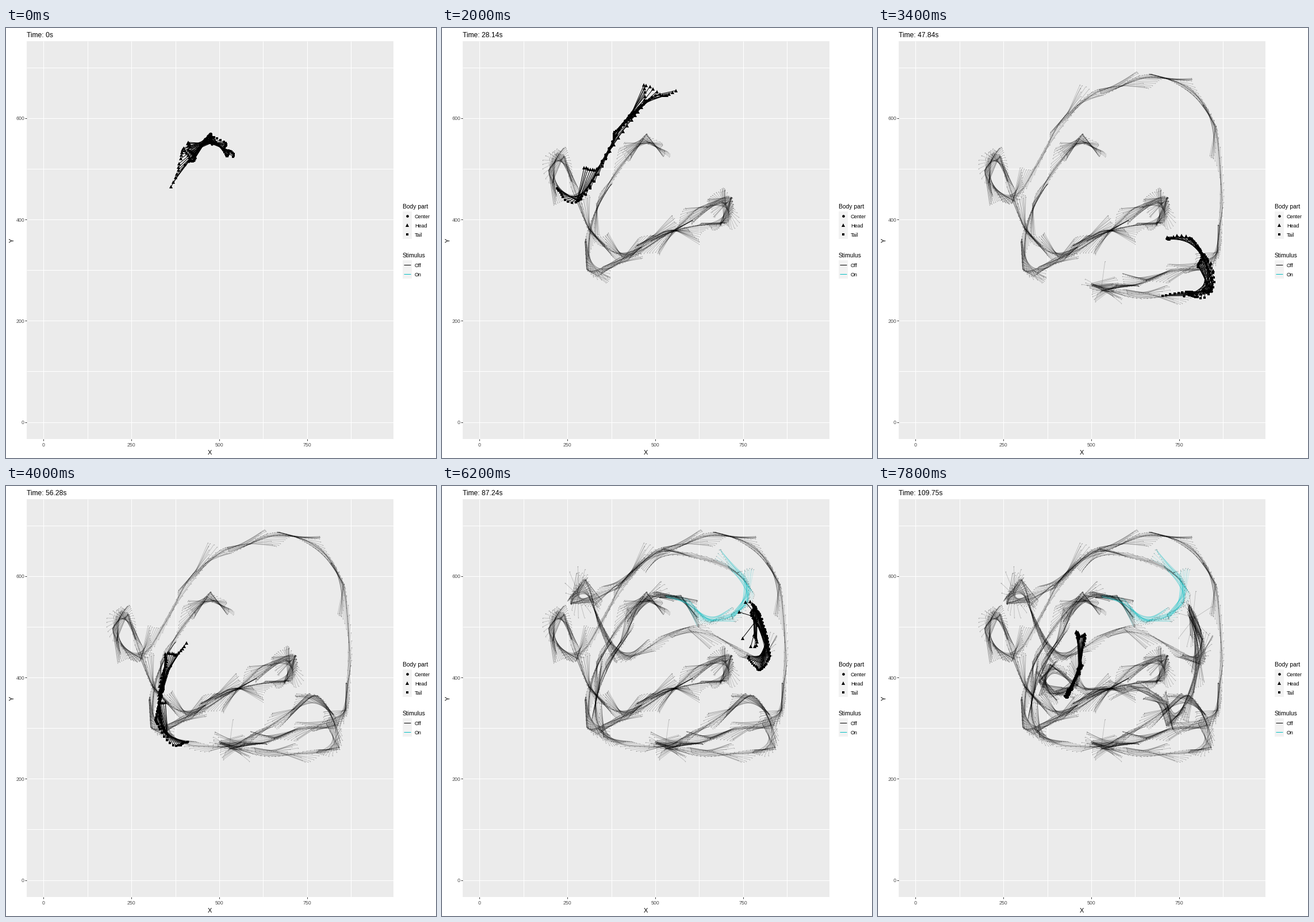
Write a matplotlib script that moves like this. It is 748 px wide and 748 px high and loops after 8 s.

```python
import numpy as np
import matplotlib.pyplot as plt
from matplotlib.animation import FuncAnimation
from matplotlib.collections import LineCollection
from matplotlib.patches import Rectangle

SIZE, DPI = 748, 100
FRAMES, STEP_MS = 40, 200
SECONDS = 2.8141
RATE = 36                           # tracked poses per frame
STRIDE = 2 / 3                      # frames from one resting point to the next
SCALE = np.array([0.6105, 0.88])    # pixels per data unit
HEAD_LEN, TAIL_LEN = 64, 59         # data units
STIM = (23.3, 25.42)                # stimulus interval, in frames
TEAL = "#00BFC4"

# Resting points of the body centre in pixels; the first and last only aim the body
ROUTE = [
    (398, 226), (362, 198), (345, 195), (268, 308), (252, 420), (309, 406),
    (365, 362), (405, 350), (490, 338), (505, 300), (462, 310), (400, 352),
    (312, 398), (256, 345), (212, 222), (186, 250), (235, 300), (329, 148),
    (425, 97), (510, 90), (588, 170), (590, 390), (542, 416), (465, 438),
    (414, 450), (372, 448), (470, 465), (578, 452), (542, 365), (500, 390),
    (400, 447), (279, 436), (271, 347), (310, 273), (350, 196), (405, 190),
    (423, 200), (470, 237), (532, 200), (514, 147), (384, 112), (305, 175),
    (225, 205), (250, 168), (284, 262), (325, 300), (430, 248), (555, 308),
    (562, 268), (540, 208), (555, 275), (548, 355), (507, 415), (500, 375),
    (440, 350), (360, 355), (300, 310), (282, 340), (305, 361), (346, 345),
    (350, 314), (352, 306), (354, 230),
]

plt.rcParams["font.family"] = "Liberation Sans"


def spline(points, u):
    """Catmull-Rom curve through the points, u counted in points."""
    p = np.vstack([2 * points[0] - points[1], points, 2 * points[-1] - points[-2]])
    k = np.clip(u.astype(int), 0, len(points) - 2)
    f = (u - k)[:, None]
    a, b, c, d = (p[k + j] for j in range(4))
    return b + f / 2 * (c - a + f * (2 * a - 5 * b + 4 * c - d
                                     + f * (3 * (b - c) + d - a)))


def smooth(a, n):
    pad = np.pad(a, ((n // 2, n // 2), (0, 0)), mode="edge")
    return np.stack([np.convolve(col, np.ones(n) / n, "valid") for col in pad.T], axis=1)


def reach(centre, goal, length, swing):
    """End of a limb that points from the centre to a goal, turned by swing."""
    v = goal - centre
    angle = np.arctan2(v[:, 1], v[:, 0]) + swing
    v = np.stack([np.cos(angle), np.sin(angle)], axis=1)
    return centre + length[:, None] * v


def build_track():
    points = np.array(ROUTE) / SCALE
    u = np.linspace(0, len(points) - 1, 6000)
    path = spline(points, u)
    arc = np.append(0, np.cumsum(np.hypot(*np.diff(path, axis=0).T)))

    def along(s):
        return np.stack([np.interp(s, arc, c) for c in path.T], axis=1)

    t = np.arange(FRAMES * RATE) / RATE
    leg, p = np.divmod(t / STRIDE, 1)
    s = np.interp(1 + leg + p * p * (3 - 2 * p), u, arc)
    rest = 1 - 4 * p * (1 - p)

    rng = np.random.default_rng(4)
    centre = along(s) + smooth(rng.normal(0, 7, (len(t), 2)), 9)
    ahead = smooth(along(s + HEAD_LEN), 5)
    behind = smooth(along(s - TAIL_LEN), 5)
    sway = np.sin(8.2 * t + 2 * np.sin(2.3 * t))
    wave = 2 * np.pi * SECONDS * t
    head = reach(centre, ahead, HEAD_LEN + 5 * np.sin(wave), (.12 + .4 * rest) * sway)
    tail = reach(centre, behind, TAIL_LEN + 5 * np.cos(wave), -.12 * sway)
    return t, np.stack([head, centre, tail], axis=1) * SCALE + 0.5


times, track = build_track()
stim_on = (times >= STIM[0]) & (times < STIM[1])
colors = np.where(stim_on, TEAL, "#000000")

fig = plt.figure(figsize=(SIZE / DPI, SIZE / DPI), dpi=DPI, facecolor="white")
ax = fig.add_axes([0, 0, 1, 1])
ax.set(xlim=(0, SIZE), ylim=(SIZE, 0))
ax.axis("off")


def px(n):
    return n * 72 / DPI


def box(x, y, w, h, color):
    ax.add_patch(Rectangle((x, y), w, h, fc=color, ec="none", zorder=0))


def line(xs, ys, color):
    ax.plot(xs, ys, color=color, lw=px(1), zorder=1, solid_capstyle="butt")


def text(x, y, s, size, color="black", ha="left", va="center_baseline", **kw):
    return ax.text(x, y, s, fontsize=px(size), color=color, ha=ha, va=va, **kw)


L, R, T, B = 36.5, 674, 22.5, 715
box(L, T, R - L, B - T, "#EBEBEB")
for k in range(8):
    gx, gy = 65.5 + k * 76.35, 685.5 - k * 88.1
    line([gx, gx], [T, B], "white")
    line([L, R], [gy, gy], "white")
    if k % 2 == 0:
        line([gx, gx], [B, B + 3], "#333333")
        line([L - 3, L], [gy, gy], "#333333")
        text(gx, 725, str(125 * k), 8.8, "#4D4D4D", ha="center")
        text(32, gy, str(100 * k), 8.8, "#4D4D4D", ha="right")
text(354.5, 738, "X", 11, ha="center")
text(10.5, 369.5, "Y", 11, ha="center", va="center", rotation=90)

PARTS = [("Head", "^", 5.6), ("Center", "o", 4.6), ("Tail", "s", 4.6)]


def markers(marker, size, xs=(), ys=()):
    return ax.plot(xs, ys, ls="", marker=marker, ms=px(size), color="black",
                   mew=0, zorder=5)[0]


text(690, 310, "Body part", 10.4)
box(690, 319, 16, 48, "#F2F2F2")
for row, part in enumerate((1, 0, 2)):
    name, shape, size = PARTS[part]
    y = 327 + 16 * row
    markers(shape, size, [698], [y])
    text(711, y + .5, name, 9)
text(690, 395, "Stimulus", 10.4)
box(690, 404, 16, 32, "#F2F2F2")
for y, name, color in ((411.5, "Off", "black"), (427.5, "On", TEAL)):
    line([692, 704.5], [y, y], color)
    text(711, y + .5, name, 9)

title = text(36, 16, "", 12.1, va="baseline")
trail = LineCollection([], linewidths=px(0.8), alpha=0.22, zorder=2)
dots = ax.scatter([], [], s=px(1.5) ** 2, c="black", alpha=0.28, lw=0, zorder=3)
now = LineCollection([], linewidths=px(1), zorder=4)
ax.add_collection(trail)
ax.add_collection(now)
ends = [markers(shape, size) for _, shape, size in PARTS]


def draw(i):
    a, b = i * RATE, (i + 1) * RATE
    title.set_text(f"Time: {round(i * SECONDS, 2):g}s")
    trail.set_segments(track[:a])
    trail.set_color(colors[:a])
    dots.set_offsets(track[:a].reshape(-1, 2))
    now.set_segments(track[a:b])
    now.set_color(colors[a:b])
    for part, artist in enumerate(ends):
        artist.set_data(track[a:b, part, 0], track[a:b, part, 1])
    return [title, trail, dots, now, *ends]


anim = FuncAnimation(fig, draw, frames=FRAMES, interval=STEP_MS,
                     repeat=True, repeat_delay=0)
plt.show()
```
